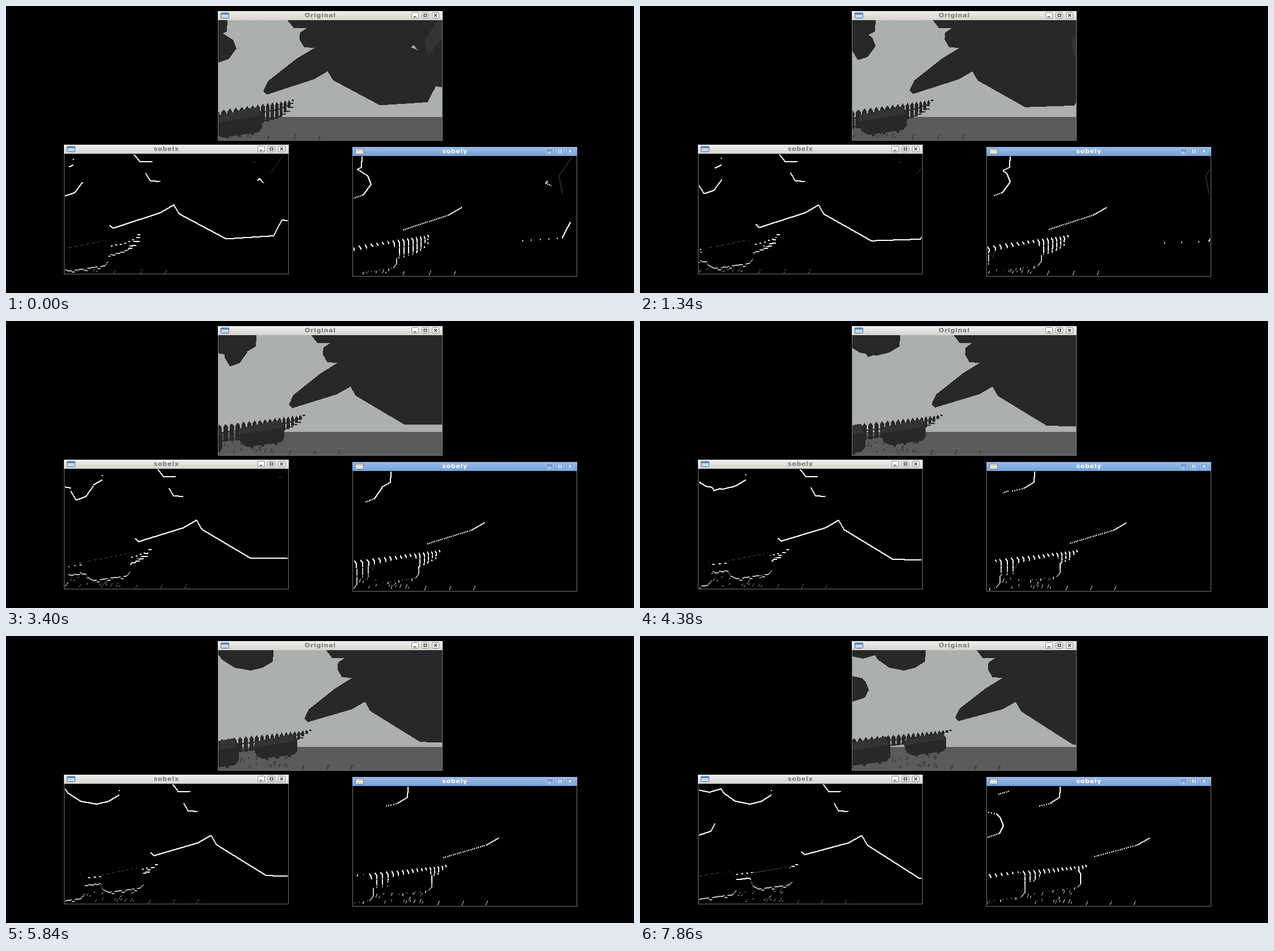
These frames come from a looping animation (1106 by 507 pixels, 8000 ms). An HTML page with a canvas:

```html
<!DOCTYPE html>
<html lang="en">
<head>
<meta charset="utf-8">
<title>Sobel filters</title>
<style>
  html, body { margin: 0; width: 100%; height: 100%; overflow: hidden; background: #000; }
  svg, canvas { position: absolute; display: block; }
  svg { left: 0; top: 0; }
  text { font: bold 11px "DejaVu Sans", sans-serif; letter-spacing: .7px; text-anchor: middle; }
</style>
</head>
<body>
<svg id="chrome" width="1106" height="507" viewBox="0 0 1106 507">
  <defs>
    <linearGradient id="idle" x2="0" y2="1"><stop stop-color="#f0f0ed"/><stop offset="1" stop-color="#d6d5cf"/></linearGradient>
    <linearGradient id="active" x2="0" y2="1"><stop stop-color="#9dbce6"/><stop offset="1" stop-color="#74a0d6"/></linearGradient>
  </defs>
</svg>
<script>
const W = 394, H = 212, LEFT = 374, TOP = 25, HORIZON = 196.5, LOOP = 8000;
const SKY = 0, GROUND = 1, DARK = 2, SHADE = 3;
const COLORS = [[172, 176, 173], [90, 90, 90], [40, 40, 40], [50, 52, 49]];
const LUMA = [175, 90, 40, 51];

// Moments at which the camera delivers a new picture
const STEPS = [0, 150, 300, 570, 690, 1060, 1340, 1990, 2140, 2540, 2690, 2840, 3120, 3400, 3680, 3800,
  4110, 4245, 4380, 4500, 4780, 5090, 5840, 5990, 6270, 6405, 6540, 6810, 7240, 7550, 7860];

// The camera turns: focal length, optical axis, total angle of far and near things
const FOCAL = 350, AXIS = 600, FAR = .27, NEAR = .23;

const outline = text => text.split(" ").map(pt => pt.split(",").map(Number));

// Tree as seen halfway, the rest as seen at the start or end of the turn
const HALF = .57;
const tree = outline("552,25 563,39.5 584,39.5 573,47 572,59 580,73 598,74 568,92.5 521,130 513,147 519,153 " +
  "597,129.5 620.5,116 630,132.5 716,185 810,187 827,154 840,157 960,157 960,25");
const canopy = outline("503.5,20 502,45 485,56 465,61 439,56 418,41 414,34 393,40 374,36 350,20");
const foliage = outline("381,48 400,60 406,75 392,94 374,100 364,84 364,40");
const bush = outline("360,68 390,74 397,80 403,95 396,109 366,119");
const carBody = outline("468,183 533,171 539,180 539,198 534,204 480,211 470,206 465,193");
const carFace = outline("468,183 533,171 537,182 465,193");
const glow = outline("761,25 737,60 743,93 755,72 775,52 775,25");
const dash = outline("704,40 711,40 709,42");
const gap = outline("713,73 718,69 725,78 719,75");

const mix = (a, b, t) => a + (b - a) * t;

const sweep = (points, angle) => points.map(([x, y]) =>
  [AXIS + FOCAL * Math.tan(Math.atan((x - AXIS) / FOCAL) + angle), y]);

function random(seed) {
  return () => (seed = (seed * 16807) % 2147483647) / 2147483647;
}
const rnd = random(41);
const grass = Array.from({ length: 18 }, () => [mix(443, 522, rnd()), mix(214, 235, rnd()), 3 + 4 * rnd()]);
for (let i = 0; i < 3; i++) grass.push([547 + 42 * i, 236, 8]);

const scene = new Uint8Array(W * H);

// Hard-edged scanline fill
function fill(points, tone) {
  const ys = points.map(pt => pt[1] - TOP);
  const y0 = Math.max(0, Math.floor(Math.min(...ys))), y1 = Math.min(H - 1, Math.ceil(Math.max(...ys)));
  for (let y = y0; y <= y1; y++) {
    const cy = y + .5 + TOP, hits = [];
    points.forEach(([ax, ay], i) => {
      const [bx, by] = points[(i + 1) % points.length];
      if ((ay <= cy) !== (by <= cy)) hits.push(ax + (cy - ay) / (by - ay) * (bx - ax) - LEFT);
    });
    hits.sort((a, b) => a - b);
    for (let i = 0; i + 1 < hits.length; i += 2) {
      const from = Math.max(0, Math.ceil(hits[i] - .5)), to = Math.min(W, Math.ceil(hits[i + 1] - .5));
      if (to > from) scene.fill(tone, y * W + from, y * W + to);
    }
  }
}
const box = (x, y, w, h, tone) => fill([[x, y], [x + w, y], [x + w, y + h], [x, y + h]], tone);

function drawFence(p) {
  const tip = mix(507, 549, p) + 8 * p * (1 - p) - 2;
  const grow = mix(.17, .11, p), slope = mix(.145, .09, p);
  const tall = mix(31, 19, p * p), taper = mix(15, 48, p);
  for (let i = 0; i < 25; i++) {
    const d = 6.3 * i + grow * i * i, x = tip - d, y = 165 + d * slope;
    const w = (6.3 + 2 * grow * i) * .74, h = 3 + tall * (1 - Math.exp(-d / taper));
    const neck = y + Math.min(5, h * .4);
    fill([[x, y], [x + w / 2, neck], [x + w * .45, y + h], [x - w * .5, y + h], [x - w / 2, neck]], DARK);
    if (h > 12) for (const f of [.4, .85]) box(x, y + h * f, w * 1.6, 2, DARK);
  }
}

// Cars share one outline; the road slides down as it nears the camera
function drawCar(p, right, size) {
  const park = points => sweep(points.map(([x, y]) =>
    [right + (x - 533) * size, 150 + (y - 150) * size * .74 ** (p - 1)]), NEAR * (p - 1));
  const body = park(carBody), a = body[5], b = body[4];
  for (const t of [.1, .42, .8]) box(mix(a[0], b[0], t), mix(a[1], b[1], t) - 2, 5, 5, DARK);
  fill(body, DARK);
  fill(park(carFace), SHADE);
}

function drawTree(p) {
  const d = p - HALF;
  const points = sweep(tree, FAR * d);
  points.forEach((pt, i) => {
    const [x, y] = tree[i];
    pt[1] += d * .0014 * (x - 590) * Math.max(0, y - 90);
  });
  fill(points, DARK);
  fill(sweep(glow, FAR * p), SHADE);
  fill(sweep(dash, FAR * p), SHADE);
  if (p < .12) fill(sweep(gap, FAR * p), SKY);
}

function drawScene(s) {
  const u = s / 30, p = u - .042 * Math.sin(Math.PI * u ** 3);
  scene.fill(SKY);
  box(LEFT, HORIZON, W, H, GROUND);
  drawFence(p);
  for (const [x, y, h] of grass) {
    const [[gx]] = sweep([[x, y]], NEAR * (p - 1));
    fill([[gx + h * .4, y - h], [gx + h * .4 + 1.3, y - h], [gx + 1.2, y], [gx, y]], DARK);
  }
  drawCar(p, 533, 1);
  drawCar(p, 433, 1.32);
  fill(sweep(foliage, .1 * p).map(([x, y]) => [x, y - 110 * p * p]), DARK);
  fill(sweep(canopy, FAR * (p - 1)), DARK);
  fill(sweep(bush, .21 * (p - 1)), DARK);
  drawTree(p);
}

const svg = document.getElementById("chrome");

function makeWindow(x, y, title, active) {
  const edge = active ? "#b4cdec" : "#85857e", face = active ? "#769fd5" : "#fafaf8";
  const ink = active ? "#f2f6fc" : "#3c3c38";
  const button = (bx, mark) => `<rect x="${bx}" y="2.5" width="12" height="10" rx="1" fill="${face}" stroke="${edge}"/>` +
    `<path d="${mark}" transform="translate(${bx} 2.5)" fill="none" stroke="${ink}" stroke-width="1.5"/>`;
  svg.insertAdjacentHTML("beforeend", `<g transform="translate(${x} ${y})">
    <rect x=".5" y=".5" width="395" height="228" fill="#000" stroke="#777"/>
    <rect width="396" height="16" fill="url(#${active ? "active" : "idle"})"/>
    <rect x="5.5" y="3" width="14" height="9.5" rx="1" fill="${active ? "#e4e4df" : "#cbd8e8"}" stroke="${active ? "#6c7886" : "#426ba4"}"/>
    <rect x="6" y="3.5" width="13" height="2.5" fill="${active ? "#c6c9cc" : "#4b7dc0"}"/>
    <text x="180.5" y="10.5" fill="${active ? "#fff" : "#777773"}">${title}</text>
    ${button(341.5, "M3 7.5h5")}${button(359.5, "M3.5 3h5v4h-5z")}${button(377.5, "M3.5 2.5l5 5m0-5l-5 5")}
  </g>`);
  const canvas = document.createElement("canvas");
  canvas.width = W;
  canvas.height = H;
  canvas.style.left = x + 1 + "px";
  canvas.style.top = y + 16 + "px";
  document.body.append(canvas);
  const ctx = canvas.getContext("2d");
  return { ctx, image: ctx.createImageData(W, H) };
}

const views = [makeWindow(373, 9, "Original"), makeWindow(102, 245, "sobelx"), makeWindow(610, 249, "sobely", true)];

function paint({ ctx, image }, pixel) {
  for (let i = 0; i < W * H; i++) image.data.set([...pixel(i), 255], i * 4);
  ctx.putImageData(image, 0, 0);
}

// 3x3 Sobel along one axis; negative slopes clip to black
const sobel = (along, across) => i => {
  const x = i % W, y = (i - x) / W;
  if (!x || !y || x === W - 1 || y === H - 1) return [0, 0, 0];
  const diff = j => LUMA[scene[j + along]] - LUMA[scene[j - along]];
  const v = diff(i - across) + 2 * diff(i) + diff(i + across);
  return [v, v, v];
};

let shown = -1;
function frame() {
  const t = performance.now() % LOOP;
  const s = STEPS.filter(at => at <= t).length - 1;
  if (s !== shown) {
    shown = s;
    drawScene(s);
    paint(views[0], i => COLORS[scene[i]]);
    paint(views[1], sobel(W, 1));
    paint(views[2], sobel(1, W));
  }
  requestAnimationFrame(frame);
}
frame();
</script>
</body>
</html>
```
